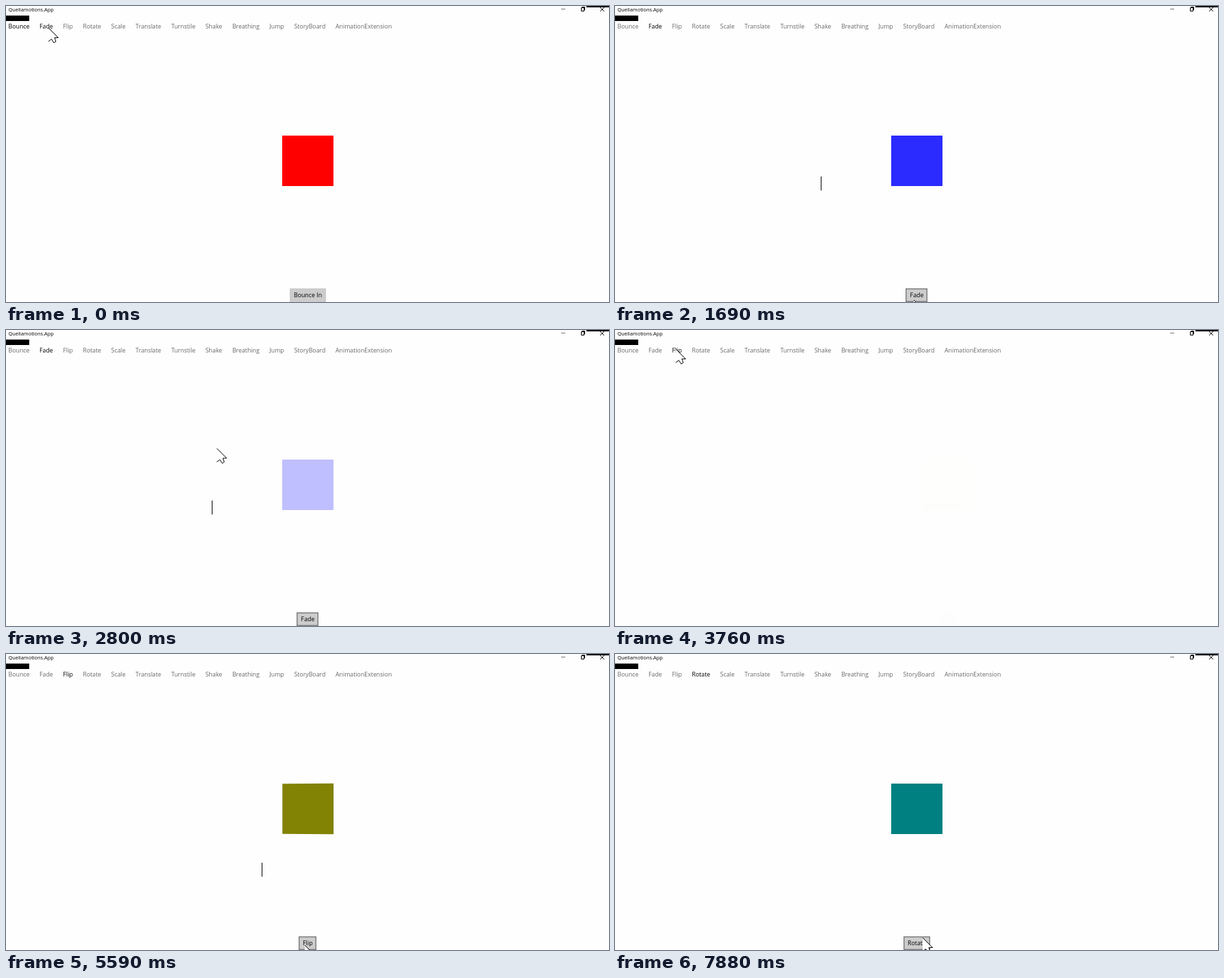
An HTML page that plays this animation: 882x434 px, repeating every 8 s.

```html
<!DOCTYPE html>
<html lang="en">
<head>
<meta charset="utf-8">
<title>Animation tabs</title>
<style>
  html, body { margin: 0; width: 100%; height: 100%; overflow: hidden; background: #fefefe; }
  svg { display: block; width: 882px; height: 434px; }
  text { font-family: "Open Sans", "Noto Sans", sans-serif; font-size: 8.8px; }
  .title { font-size: 7.4px; }
  .line { fill: none; stroke: #000; }
</style>
</head>
<body>
<svg viewBox="0 0 882 434">
  <rect width="882" height="434" fill="#fefefe"/>
  <text class="title" x="3.5" y="8">Quellamotions.App</text>
  <rect y="14" width="34" height="8"/>
  <rect x="849" width="33" height="2"/>
  <path class="line" d="M812 4.5H818" style="stroke:#777"/>
  <path class="line" d="M841.5 2.5H845.5V7.5H841.5ZM842.5 1.5H846.5V6"/>
  <path class="line" d="M869 2L875 8M875 2L869 8" stroke-width=".9"/>
  <g id="tabs"></g>
  <g id="page">
    <polygon id="box"/>
    <rect id="button" y="414" height="20" fill="#ccc"/>
    <rect id="border" y="414.7" height="18.6" class="line" style="stroke:#7a7a7a" stroke-width="1.4"/>
    <text id="label" x="441.5" y="427.3" text-anchor="middle"></text>
  </g>
  <path id="trail" class="line" d="M.5 0V20.5"/>
  <g id="cursor">
    <path fill="#fff" d="M0 0L14.5 14.5H9L11 20L8 22L4.5 16.5L0 20Z"/>
    <path class="line" d="M0 0L14.5 14.5H9L11 20L8 22L4.5 16.5L0 20"/>
  </g>
</svg>
<script>
const LOOP = 8000;
const CX = 441.5, CY = 227, HALF_W = 37.5, HALF_H = 37, DISTANCE = 400;
const OUT = 160, IN = 320;
const TAB_LEFT = 3.5, LAST_TAB = 482, PADDING = 12;

const NAMES = ["Bounce", "Fade", "Flip", "Rotate", "Scale", "Translate", "Turnstile",
  "Shake", "Breathing", "Jump", "StoryBoard", "AnimationExtension"];

// lit: tab hover, open: tab click, hover: button hover,
// drop: where and when the pointer leaves its edge behind
const PAGES = [
  { label: "Bounce In", color: "#f00", lit: -LOOP, open: -LOOP, hover: LOOP },
  { label: "Fade", color: "#00f", lit: 0, open: 300, hover: 1190,
    drop: { at: 780, x: 301, y: 250 }, fade: [1365, 3280] },
  { label: "Flip", color: "#808000", lit: 3280, open: 3600, hover: 4780,
    drop: { at: 4090, x: 374, y: 306 }, flip: [5200, 5605] },
  { label: "Rotate", color: "#008080", lit: 6360, open: 6512, hover: 7580 }
];

// Pointer trips, each from where the last one ended
const HOME = { x: 62, y: 32 };
const TRIPS = [
  { from: 450, to: 1190, x: 437, y: 431 },
  { from: 2500, to: 3460, x: 88, y: 27, bendX: 112, bendY: -88 },
  { from: 3760, to: 4600, x: 439, y: 398 },
  { from: 4600, to: 4930, x: 437, y: 427 },
  { from: 5740, to: 6360, x: 131, y: 25 },
  { from: 6880, to: 7580, x: 450, y: 416 }
];

const el = id => document.getElementById(id);
const set = (node, attrs) => {
  for (const k in attrs) node.setAttribute(k, attrs[k]);
};
const move = (x, y) => ({ transform: `translate(${x} ${y})` });
const part = (t, from, to) => Math.min(1, Math.max(0, (t - from) / (to - from)));
const easeOut = p => 1 - (1 - p) ** 2;
const box = el("box"), page = el("page"), button = el("button"), border = el("border"),
  label = el("label"), trail = el("trail"), cursor = el("cursor");

const tabs = NAMES.map(name => {
  const node = document.createElementNS("http://www.w3.org/2000/svg", "text");
  node.textContent = name;
  el("tabs").append(node);
  return node;
});

// Equal gaps between the tab names
function placeTabs() {
  const widths = tabs.map(tab => tab.getComputedTextLength());
  const used = widths.slice(0, -1).reduce((a, b) => a + b, 0);
  const gap = (LAST_TAB - TAB_LEFT - used) / (tabs.length - 1);
  let x = TAB_LEFT;
  tabs.forEach((tab, i) => {
    set(tab, { x, y: 33 });
    x += widths[i] + gap;
  });
}

function pointer(t) {
  let at = HOME;
  for (const trip of TRIPS) {
    if (t < trip.from) break;
    const p = easeOut(part(t, trip.from, trip.to));
    const { bendX = 0, bendY = 0 } = trip;
    const curve = (a, b, bend) => a + (b - a) * p + 2 * p * (1 - p) * bend;
    at = { x: curve(at.x, trip.x, bendX), y: curve(at.y, trip.y, bendY) };
  }
  return at;
}

// Square turned about its vertical axis, seen in perspective
function turned(angle) {
  const c = Math.cos(angle) * HALF_W, depth = Math.sin(angle) * HALF_W / DISTANCE;
  const near = 1 / (1 - depth), far = 1 / (1 + depth);
  const l = CX - c * far, r = CX + c * near;
  return `${l},${CY - HALF_H * far} ${r},${CY - HALF_H * near} ` +
    `${r},${CY + HALF_H * near} ${l},${CY + HALF_H * far}`;
}

function drawBox(t, { color, fade, flip }) {
  let angle = 0, opacity = 1;
  if (fade) opacity = 1 - part(t, ...fade);
  if (flip && t >= flip[0]) {
    const p = part(t, ...flip);
    angle = (1 - p) * Math.PI / 2;
    opacity = 0.5 + p / 2;
  }
  set(box, { points: turned(angle), fill: color, opacity });
}

function drawButton(t, shown) {
  label.textContent = shown.label;
  const width = Math.round(label.getComputedTextLength() + PADDING);
  const x = Math.floor(CX - width / 2);
  set(button, { x, width });
  set(border, { x: x + 0.7, width: width - 1.4, opacity: t >= shown.hover ? 1 : 0 });
}

function slidePage(since) {
  const gone = part(since, 0, OUT), rest = 1 - part(since, OUT, OUT + IN);
  const leaving = gone < 1;
  set(page, {
    ...move(leaving ? -30 * gone ** 2 : 46 * rest ** 3, 0),
    opacity: leaving ? 1 - gone : 1 - rest ** 1.5
  });
}

function draw(t) {
  const opened = PAGES.filter(p => t >= p.open).length - 1;
  const since = t - PAGES[opened].open;
  const shown = PAGES[since < OUT ? opened - 1 : opened];

  slidePage(since);
  drawBox(t, shown);
  drawButton(t, shown);

  tabs.forEach((tab, i) => {
    const active = i === opened || (i > opened && t >= PAGES[i]?.lit);
    set(tab, { fill: active ? "#000" : "#686868" });
  });

  const { drop } = shown;
  set(trail, { opacity: drop && t >= drop.at ? 1 : 0 });
  if (drop) set(trail, move(drop.x, drop.y));

  const { x, y } = pointer(t);
  set(cursor, move(x, y));
}

placeTabs();
const start = performance.now();
function frame() {
  draw((performance.now() - start) % LOOP);
  requestAnimationFrame(frame);
}
frame();
</script>
</body>
</html>
```
